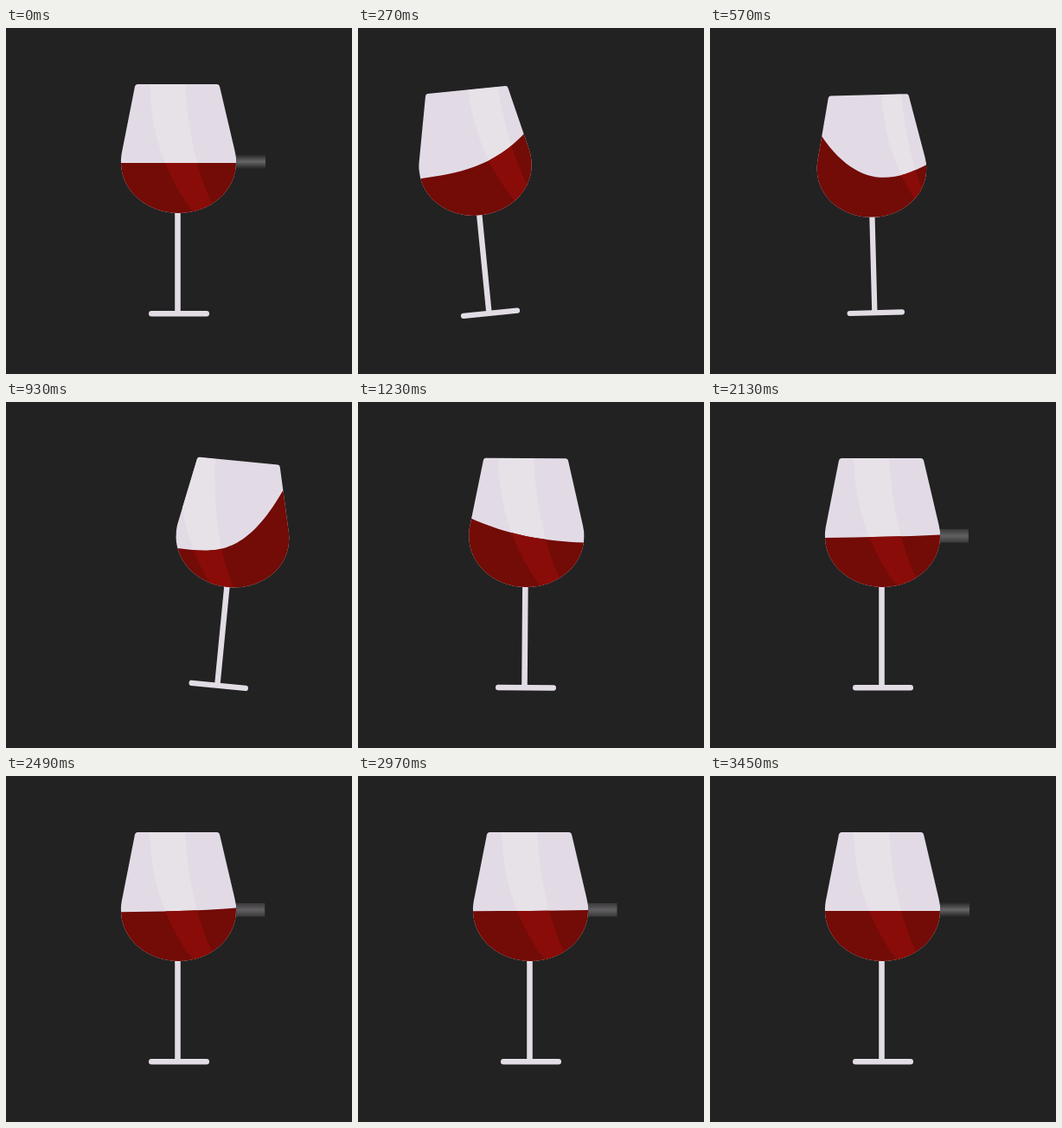
Animation, 400 px wide and 400 px high, one loop 8000 ms. Source, as an HTML page:

```html
<!DOCTYPE html>
<html lang="en">
<head>
<meta charset="utf-8">
<title>Swirling wine glass</title>
<style>
  html, body { margin: 0; width: 100%; height: 100%; overflow: hidden; background: #222; }
  svg { display: block; width: 100%; height: 100%; }
</style>
</head>
<body>
<svg viewBox="0 0 400 400">
  <defs>
    <clipPath id="bowlClip"><use href="#bowl"/></clipPath>
    <clipPath id="wineClip"><path id="wineShape"/></clipPath>
    <path id="bowl" d="M152 65H244Q246.500 65 247 67.500L264.500 142Q266.500 150 266 156A66.500 58 0 0 1 133 156Q132.500 150 134.500 141L149 67.500Q149.500 65 152 65Z"/>
    <linearGradient id="softBar" x2="0" y2="1">
      <stop offset="0" stop-color="#222"/>
      <stop offset=".5" stop-color="#666"/>
      <stop offset="1" stop-color="#222"/>
    </linearGradient>
    <linearGradient id="firmBar" x2="0" y2="1">
      <stop offset="0" stop-color="#3b3a3b"/>
      <stop offset=".5" stop-color="#626062"/>
      <stop offset="1" stop-color="#3b3a3b"/>
    </linearGradient>
  </defs>
  <rect width="400" height="400" fill="#222"/>
  <rect id="bar" x="260"/>
  <g id="glass">
    <path d="M198.500 210V329" stroke="#e2dce4" stroke-width="6.600"/>
    <rect x="165" y="327" width="70" height="6.500" rx="3.250" fill="#e2dce4"/>
    <use href="#bowl" fill="#e2dbe6"/>
    <g clip-path="url(#bowlClip)">
      <path class="shine" fill="#e7e1e8"/>
      <g clip-path="url(#wineClip)">
        <rect x="120" y="50" width="160" height="170" fill="#730b06"/>
        <path class="shine" fill="#890c08"/>
      </g>
    </g>
  </g>
</svg>
<script>
  const LOOP = 8000, STEP = 30, REST = 1650, STILL = 3450, FREE = 1500, LEVEL = 156;
  const $ = id => document.getElementById(id);
  const shines = document.querySelectorAll('.shine');

  // Each key is [time, ...values]; values ease in and out between keys.
  function tween(keys, t) {
    const i = keys.findIndex(k => k[0] > t);
    if (i < 0) return keys[keys.length - 1].slice(1);
    if (i === 0) return keys[0].slice(1);
    const a = keys[i - 1], b = keys[i];
    const e = (1 - Math.cos(Math.PI * (t - a[0]) / (b[0] - a[0]))) / 2;
    return a.slice(1).map((v, n) => v + (b[n + 1] - v) * e);
  }

  const slide = [[0, 0], [310, -49], [885, 47], [1460, -34], [REST, 0]];
  const tilt = [[0, 0], [320, -6], [905, 5.6], [1490, -3.2], [REST, 0]];
  const lift = [[0, 0], [570, -1], [900, -2.5], [1230, 0]];
  const size = [[0, 1], [600, .95], [1150, 1]];
  const gleam = [[0, 0, 0], [320, 36, 30], [570, 48, 31], [930, -37, -37], [1230, 0, 0], [1480, 24, 20], [REST, 0, 0]];

  // Heights of the wine surface: left end, two curve handles, right end.
  function settle(t) {
    const s = Math.exp((1770 - t) / 480) * Math.cos(2 * Math.PI * (t - 1770) / 510);
    const wave = [-19, 0, 2, 7].map(v => LEVEL + v * Math.abs(s));
    return s < 0 ? wave.reverse() : wave;
  }
  const slosh = [
    [0, LEVEL, LEVEL, LEVEL, LEVEL],
    [280, 164, 162, 160, 118],
    [570, 103, 178, 174, 152],
    [930, 174, 174, 186, 62],
    [1230, 134, 154, 161, 162],
    [FREE, ...settle(FREE)]
  ];
  function surface(t) {
    if (t >= STILL) return slosh[0].slice(1);
    return t < FREE ? tween(slosh, t) : settle(t);
  }

  function draw(t) {
    const [x] = tween(slide, t), [y] = tween(lift, t);
    const [angle] = tween(tilt, t), [scale] = tween(size, t);
    $('glass').setAttribute('transform',
      `translate(${199.5 + x} ${330 + y}) rotate(${angle}) scale(${scale}) translate(-199.5 -330)`);

    const [l, c1, c2, r] = surface(t);
    $('wineShape').setAttribute('d', `M133 ${l}C177 ${c1} 222 ${c2} 266 ${r}H280V220H120V${l}Z`);

    const [a, b] = tween(gleam, t);
    const band = `M${166 + a} 65Q${168 + a} 150 ${217 + a} 214H${243 + b}L${240 + b} 207Q${212 + b} 150 ${207 + b} 65Z`;
    shines.forEach(p => p.setAttribute('d', band));

    const still = t < STEP || t >= STILL;
    const end = still ? 300 : 300 - 1.5 * Math.exp((1770 - t) / 1200);
    const bar = {
      y: still ? 146 : 147,
      width: end - 260,
      height: still ? 17 : 15.5,
      fill: still ? 'url(#softBar)' : 'url(#firmBar)',
      visibility: still || t >= REST ? 'visible' : 'hidden'
    };
    for (const name in bar) $('bar').setAttribute(name, bar[name]);
  }

  const start = performance.now();
  function frame() {
    const t = (performance.now() - start) % LOOP;
    draw(Math.floor(t / STEP) * STEP);
    requestAnimationFrame(frame);
  }
  draw(0);
  requestAnimationFrame(frame);
</script>
</body>
</html>
```
